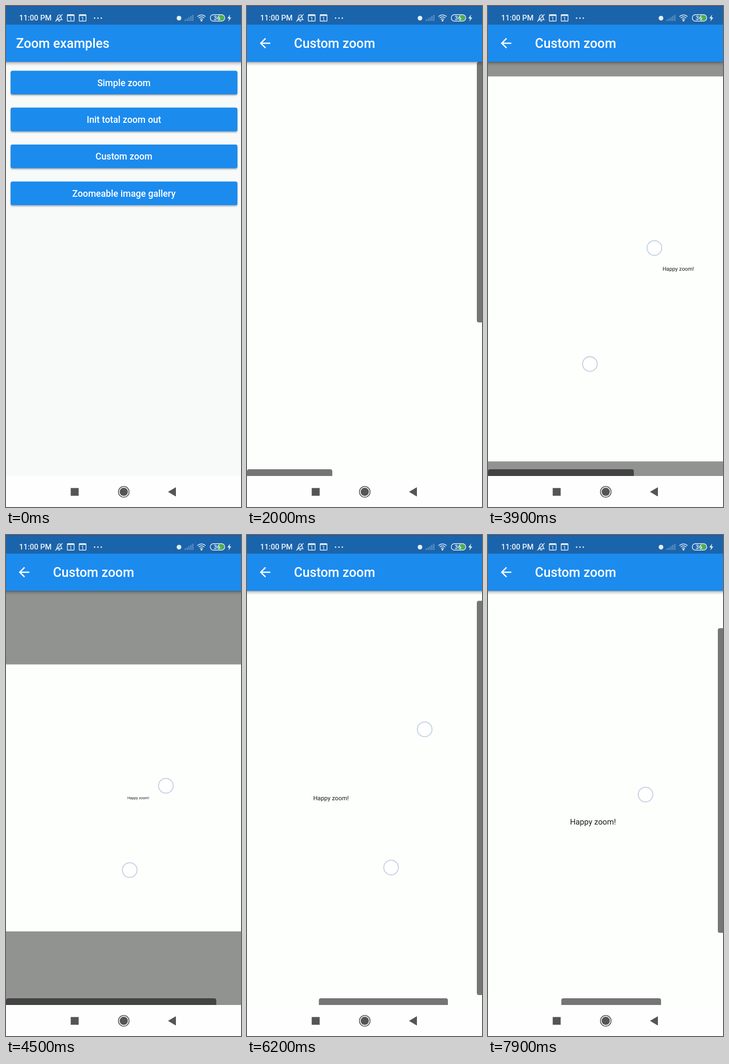
An HTML page that plays this animation: 455 by 969 pixels, repeating every 8 s.

```html
<!DOCTYPE html>
<html lang="en">
<head>
<meta charset="utf-8">
<title>Zoom demo</title>
<style>
  html, body { margin: 0; width: 100%; height: 100%; overflow: hidden; background: #fdfffd; }
  svg { display: block; width: 100%; height: 100%; font-family: Roboto, Inter, sans-serif; }
  .title { font-size: 25.2px; font-weight: 500; fill: #fff; }
  .label { font-size: 17.7px; font-weight: 500; fill: #fff; text-anchor: middle; }
  .line { fill: none; stroke: #e6eef6; stroke-width: 1.4; }
</style>
</head>
<body>
<svg viewBox="0 0 455 969" xmlns="http://www.w3.org/2000/svg">
  <defs>
    <linearGradient id="shade" x1="0" y1="0" x2="0" y2="1">
      <stop offset="0" stop-color="#000" stop-opacity=".36"/>
      <stop offset=".4" stop-color="#000" stop-opacity=".13"/>
      <stop offset="1" stop-color="#000" stop-opacity="0"/>
    </linearGradient>
    <filter id="drop" x="-5%" y="-20%" width="110%" height="150%">
      <feDropShadow dx="0" dy="1.8" stdDeviation="1.4" flood-color="#000" flood-opacity=".36"/>
    </filter>
    <clipPath id="pressed"><rect x="9" y="268" width="439" height="45.8" rx="3.5"/></clipPath>
    <g id="bar">
      <rect y="108" width="455" height="8" fill="url(#shade)"/>
      <rect y="36" width="455" height="72" fill="#1c8bee"/>
      <rect width="455" height="36" fill="#1a64ab"/>
      <rect width="455" height="1" fill="#2b4a9e"/>
    </g>
    <g id="day">
      <rect x=".7" y=".7" width="13.2" height="12.6" rx="1" class="line"/>
      <rect x=".7" y=".7" width="13.2" height="2.6" fill="#e6eef6"/>
      <text x="7.3" y="11.6" font-size="9" font-weight="500" fill="#e6eef6" text-anchor="middle">1</text>
    </g>
  </defs>

  <g id="menu">
    <rect width="455" height="969" fill="#f8faf9"/>
    <use href="#bar"/>
    <text class="title" x="19.5" y="81">Zoom examples</text>
    <g id="buttons"></g>
    <g clip-path="url(#pressed)"><circle id="ripple" cx="250" cy="291" fill="#fff"/></g>
  </g>

  <g id="page">
    <rect y="108" width="455" height="861" fill="#919390"/>
    <rect id="sheet" fill="#fdfffd"/>
    <text id="greeting" font-size="6.45" fill="#1c1c1c" text-anchor="middle" text-rendering="geometricPrecision">Happy zoom!</text>
    <path id="thumbX" fill="#000" fill-opacity=".54"/>
    <path id="thumbY" fill="#000" fill-opacity=".54"/>
    <use href="#bar"/>
    <path transform="translate(19.8 56.8) scale(1.264)" fill="#fff"
      d="M20 11H7.83l5.59-5.59L12 4l-8 8 8 8 1.41-1.41L7.83 13H20z"/>
    <text class="title" x="91" y="81">Custom zoom</text>
  </g>

  <g id="status">
    <text x="25.5" y="28.2" font-size="14.6" font-weight="500" fill="#eef4fa">11:00 PM</text>
    <path class="line" d="M98 26.5c2-2 1-7 3-8.500c2-1.500 4-1 5 1c1 3 0 5 2.500 7.500zM101 29h4M95.500 30L109.500 16"/>
    <use href="#day" x="118" y="16"/>
    <use href="#day" x="141" y="16"/>
    <g fill="#e6eef6">
      <circle cx="171.500" cy="23.500" r="1.400"/><circle cx="178" cy="23.500" r="1.400"/><circle cx="184.500" cy="23.500" r="1.400"/>
      <circle cx="335" cy="23.500" r="4.500"/>
      <path d="M346 29v-3h2v3zM349.700 29v-5h2v5zM353.400 29v-7.500h2v7.500zM357.100 29v-10h2v10zM360.800 29v-12h2v12z" opacity=".36"/>
      <path d="M434 16.500l-5.500 7.500h3.500l-1.500 6 5.700-7.800h-3.500z"/>
      <circle cx="378.500" cy="28.200" r="1.800"/>
    </g>
    <path class="line" stroke-width="1.800" d="M370.500 20.500q8-6.500 16 0M373 23.300q5.500-4.500 11 0M375.500 26q3-2.500 6 0"/>
    <path d="M411 17.500h6a5.500 5.500 0 0 1 0 11h-6z" fill="#4caf50"/>
    <rect class="line" x="395.500" y="16.700" width="28" height="12.600" rx="6.300"/>
    <text x="408.500" y="27.200" font-size="11.500" font-weight="500" fill="#fff" text-anchor="middle">36</text>
  </g>

  <g id="nav" fill="#555">
    <rect y="909" width="455" height="60" fill="#fefefe"/>
    <rect x="125.300" y="932.300" width="15.400" height="15"/>
    <circle cx="228" cy="939.700" r="7.900"/>
    <circle cx="228" cy="939.700" r="10.400" fill="none" stroke="#555" stroke-width="1.500"/>
    <path d="M314.500 939.700L328.500 931.500V948z" stroke="#555" stroke-linejoin="round"/>
  </g>

  <g fill="#fff" fill-opacity=".45" stroke="#bccbdd" stroke-opacity=".9" stroke-width="1.800">
    <circle id="touchA" r="14.200"/>
    <circle id="touchB" r="14.200"/>
  </g>
</svg>
<script>
const LOOP = 8000, VIEW = { w: 455, h: 801, top: 108, bottom: 909 };
const BASE_H = 462; // sheet height when its width fits the view
const $ = id => document.getElementById(id);
const set = (id, attrs) => {
  for (const key in attrs) $(id).setAttribute(key, attrs[key]);
};
const clamp = (v, lo = 0, hi = 1) => Math.min(hi, Math.max(lo, v));

// Linear track over rows of [time, ...values].
function track(rows, t) {
  if (t <= rows[0][0]) return rows[0].slice(1);
  for (let i = 1; i < rows.length; i++) {
    const a = rows[i - 1], b = rows[i];
    if (t <= b[0]) {
      const p = (t - a[0]) / (b[0] - a[0]);
      return a.slice(1).map((v, j) => v + (b[j + 1] - v) * p);
    }
  }
  return rows[rows.length - 1].slice(1);
}

function bezier(x1, y1, x2, y2) {
  const at = (u, a, b) => 3 * (1 - u) ** 2 * u * a + 3 * (1 - u) * u * u * b + u ** 3;
  return x => {
    if (x <= 0 || x >= 1) return clamp(x);
    let lo = 0, hi = 1;
    for (let i = 0; i < 24; i++) {
      const mid = (lo + hi) / 2;
      if (at(mid, x1, x2) < x) lo = mid; else hi = mid;
    }
    return at(lo, y1, y2);
  };
}
const slideEase = bezier(.4, 0, .2, 1), fadeEase = bezier(.42, 0, 1, 1);

// Fingers: time, first x, y, second x, y.
const pinchIn = [[2600, 350, 420, 110, 788], [3300, 335, 451, 155, 737],
  [4500, 309.5, 485, 239.5, 648], [5200, 306, 492, 240, 640]];
const pinchOut = [[5500, 328, 430, 306, 578], [5800, 331.5, 412, 299, 595],
  [6200, 344, 376, 279, 643], [6600, 352, 345, 258, 690]];
const pan = [[6700, 221, 454], [7100, 268, 436], [7500, 315, 470], [7900, 305, 502]];
const zoom = [[2600, 2.755], [3300, 2.107], [4500, 1.118], [4800, 1], [5500, 1],
  [5800, 1.221], [6200, 1.82], [6560, 2.357]];
const centerX = [[5500, 227.5], [5800, 212.5], [6200, 161], [6560, 118]];

['Simple zoom', 'Init total zoom out', 'Custom zoom', 'Zoomeable image gallery'].forEach((name, i) => {
  const y = 125.2 + 71.4 * i;
  $('buttons').innerHTML +=
    `<rect x="9" y="${y}" width="439" height="45.8" rx="3.5" fill="#1c8bee" filter="url(#drop)"/>` +
    `<text class="label" x="228.3" y="${y + 29.3}">${name}</text>`;
});

function touches(t) {
  if (t >= 400 && t < 600) return [250, 291];
  if (t >= 2600 && t < 5200) return track(pinchIn, t);
  if (t >= 5500 && t < 6600) return track(pinchOut, t);
  if (t >= 6700) return track(pan, t);
  return [];
}

function sheetAt(t) {
  const [k] = track(zoom, t);
  const w = VIEW.w * k, h = BASE_H * k;
  let cx = w / 2, cy = Math.max((VIEW.top + VIEW.bottom) / 2, VIEW.top + h / 2);
  if (t >= 5500) {
    [cx] = track(centerX, t);
    cy = (VIEW.top + VIEW.bottom) / 2;
  }
  if (t >= 6700) {
    const [x, y] = track(pan, t);
    cx = x - 103.5;
    cy = y + 52.3;
  }
  return { k, w, h, cx, cy, x: cx - w / 2, y: cy - h / 2 };
}

function drawSheet(t) {
  const s = sheetAt(t);
  set('sheet', { x: s.x, y: s.y, width: s.w, height: s.h });
  set('greeting', { transform: `translate(${s.cx + 1.7} ${s.cy + 2.25 * s.k}) scale(${s.k})` });

  const x = -s.x / s.w * VIEW.w, len = VIEW.w * VIEW.w / s.w;
  set('thumbX', { d: s.k > 1.001 ? `M${x} 909V900q0-4 4-4H${x + len - 4}q4 0 4 4V909z` : '' });

  const y = VIEW.top + (VIEW.top - s.y) / s.h * VIEW.h, tall = VIEW.h * VIEW.h / s.h;
  set('thumbY', { d: s.h > VIEW.h ? `M455 ${y}H449q-4 0-4 4V${y + tall - 4}q0 4 4 4H455z` : '' });
}

function draw(t) {
  const p = clamp((t - 839) / 300);
  set('page', {
    opacity: fadeEase(p),
    transform: `translate(0 ${242 * (1 - slideEase(p))})`
  });
  const r = clamp((t - 400) / 500);
  set('ripple', {
    r: 20 + 240 * r * r,
    opacity: t < 400 ? 0 : .24 * clamp((1050 - t) / 350)
  });
  drawSheet(t);
  const [ax, ay, bx, by] = touches(t);
  const place = (id, x, y) =>
    set(id, x === undefined ? { visibility: 'hidden' } : { visibility: 'visible', cx: x, cy: y });
  place('touchA', ax, ay);
  place('touchB', bx, by);
}

const start = performance.now();
function tick() {
  draw((performance.now() - start) % LOOP);
  requestAnimationFrame(tick);
}
tick();
</script>
</body>
</html>
```
